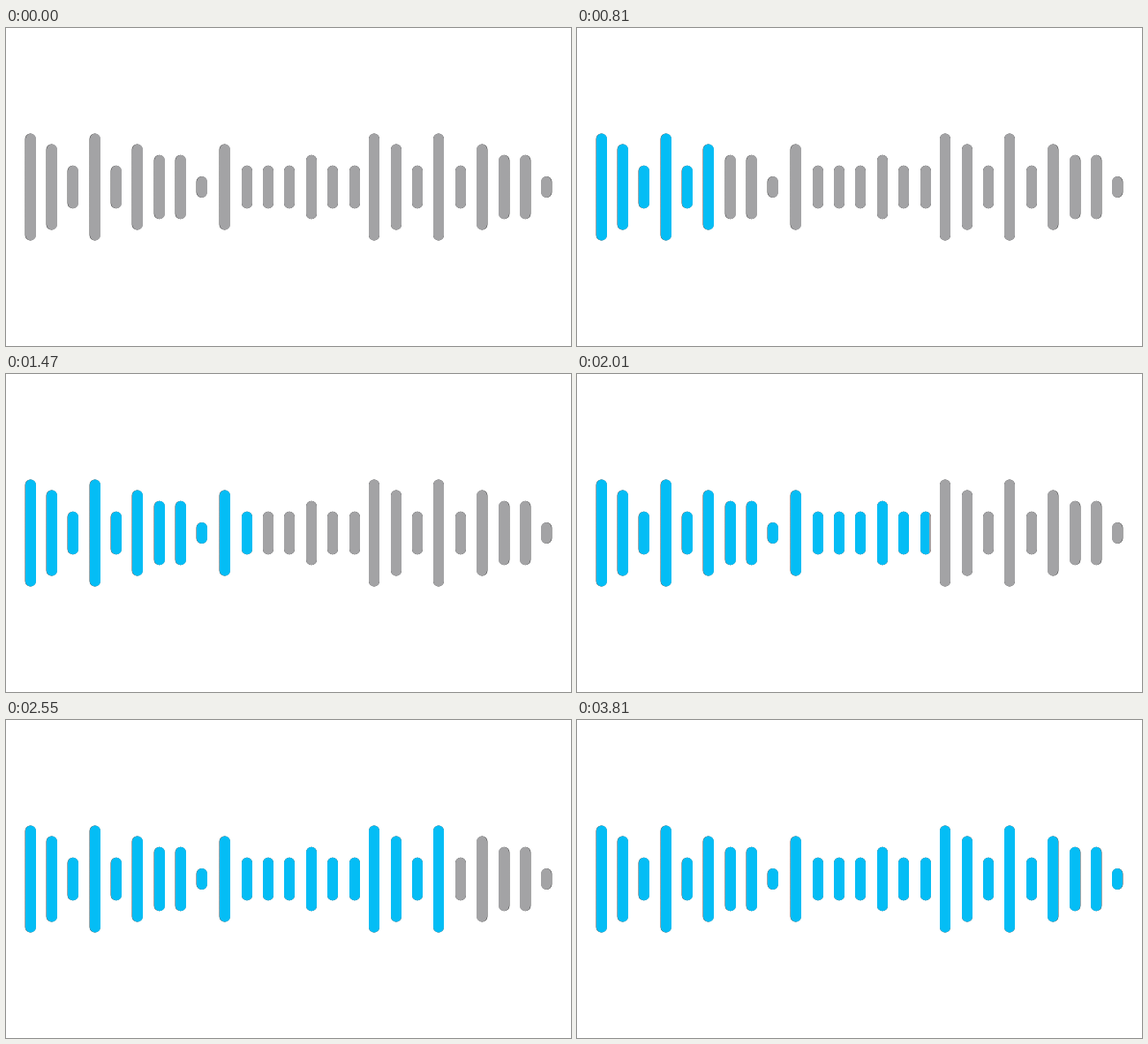
An HTML page with a canvas for the animation above (3.9 s loop, 640 by 360 pixels).

```html
<!DOCTYPE html>
<html lang="en">
<head>
<meta charset="utf-8">
<title>Waveform progress</title>
<style>
  html, body { margin: 0; width: 100%; height: 100%; overflow: hidden; background: #fff; }
  canvas { display: block; }
</style>
</head>
<body>
<canvas id="stage" width="640" height="360"></canvas>
<script>
const ctx = document.getElementById("stage").getContext("2d");
const LOOP = 3900, STEP = 30;
const LEFT = 21.6, PITCH = 24.36, UNIT = 24.2, BAR_WIDTH = 12, MID_Y = 180;
const GREY = "#a3a3a5", BLUE = "#04bdf5", EDGE = "#222";
const levels = [..."5425243314222322542524331"].map(Number);

const bars = levels.map((level, i) => ({
  // The middle group sits slightly to the right of the even spacing.
  x: Math.round(LEFT + i * PITCH + (i > 8 && i < 16 ? 1.5 : 0)),
  height: level * UNIT,
  edgeShift: i < 10 ? -0.4 : i > 20 ? 0.4 : 0
}));

function fillBars(color, isEdge) {
  ctx.fillStyle = color;
  ctx.beginPath();
  for (const { x, height, edgeShift } of bars) {
    const left = isEdge ? x + edgeShift : x;
    ctx.roundRect(left, MID_Y - height / 2, BAR_WIDTH, height, BAR_WIDTH / 2);
  }
  ctx.fill();
}

function draw(time) {
  const t = Math.floor((time % LOOP) / STEP) * STEP;
  const progress = Math.round(-7 + 0.2021 * t);

  ctx.fillStyle = "#fff";
  ctx.fillRect(0, 0, 640, 360);
  fillBars(EDGE, true);
  fillBars(GREY, false);

  if (progress > 0) {
    ctx.save();
    ctx.beginPath();
    ctx.rect(0, 0, progress, 360);
    ctx.clip();
    fillBars(BLUE, false);
    ctx.restore();
  }
}

const start = performance.now();
function tick() {
  draw(performance.now() - start);
  requestAnimationFrame(tick);
}
tick();
</script>
</body>
</html>
```
